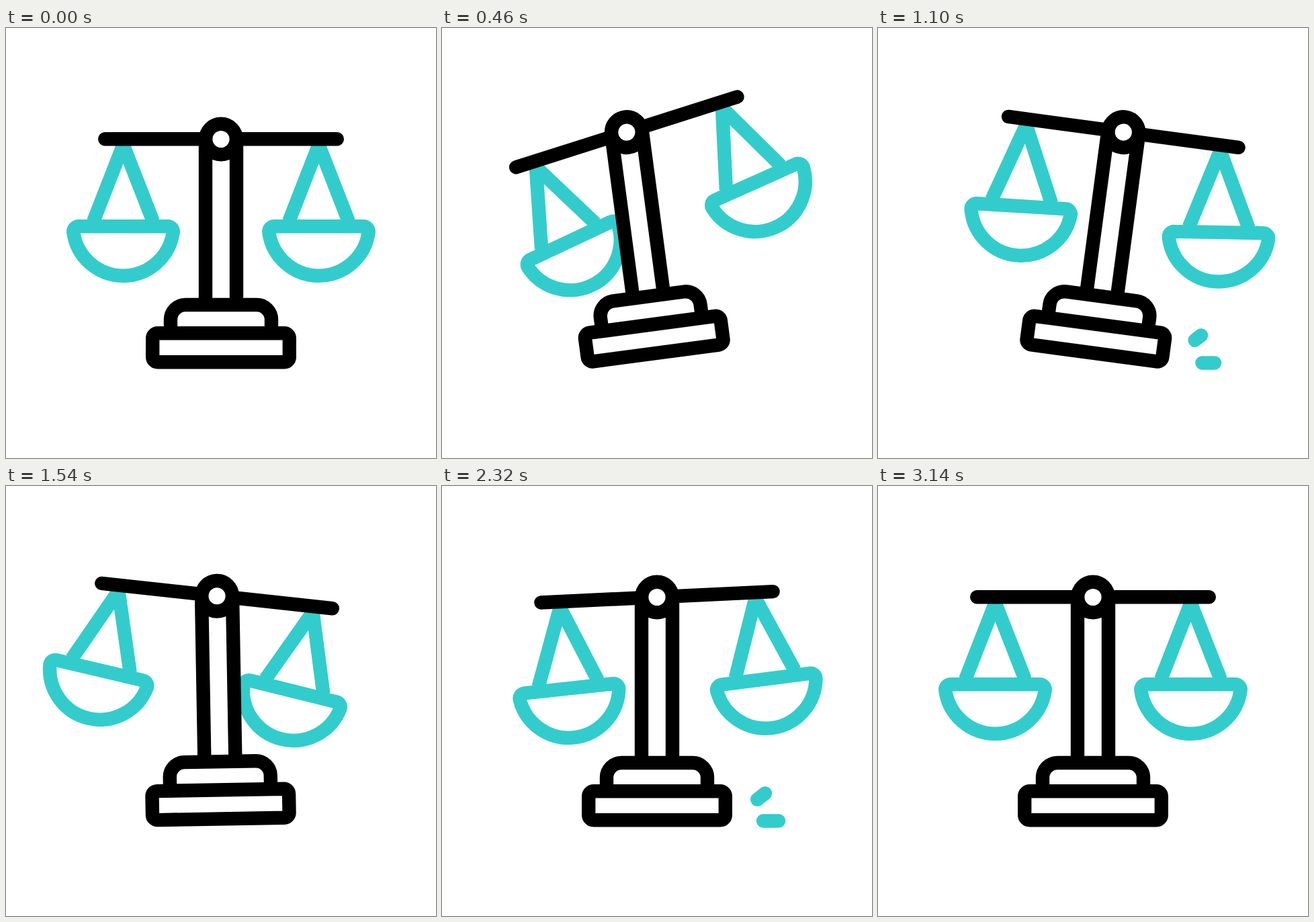
Animation, 640 px wide and 640 px high, one loop 3.6 s. Source, as an HTML page:

```html
<!DOCTYPE html>
<html lang="en">
<head>
<meta charset="utf-8">
<title>Swaying scales</title>
<style>
  html, body { margin: 0; width: 100%; height: 100%; overflow: hidden; background: #fff; }
  svg { display: block; width: 100vw; height: 100vh; }
  .line { fill: none; stroke: #000; stroke-width: 20.4; }
  .teal { fill: none; stroke: #33cccc; stroke-width: 20.4; stroke-linejoin: round; }
  .spark { stroke: #33cccc; stroke-width: 20.4; stroke-linecap: round; }
</style>
</head>
<body>
<svg viewBox="0 0 640 640">
  <defs>
    <g id="pan" class="teal">
      <path d="M130 288 L174.5 174 L219 288"/>
      <path d="M108.5 295.2 H240.5 a8 8 0 0 1 8.2 8.8 A74.9 74.9 0 0 1 100.3 304 a8 8 0 0 1 8.2 -8.8 Z"/>
    </g>
  </defs>
  <g id="body">
    <g id="beam">
      <use id="left" href="#pan"/>
      <g transform="translate(291 0)"><use id="right" href="#pan"/></g>
      <path class="line" stroke-linecap="round" d="M147.2 165.3 H492.8"/>
    </g>
    <path fill="#fff" d="M297 190 H343 V412 H297 Z"/>
    <path class="line" d="M297 165 V412 M343 165 V412"/>
    <circle class="line" cx="320" cy="165.5" r="22.8" style="fill:#fff"/>
    <path class="line" d="M245 454 V434 a22 22 0 0 1 22 -22 H373 a22 22 0 0 1 22 22 V454"/>
    <rect class="line" x="218.2" y="454.2" width="203.6" height="43" rx="7.5"/>
  </g>
  <g id="sparks">
    <line class="spark"/>
    <line class="spark"/>
  </g>
</svg>
<script>
  const LOOP = 3600, STEP = 20, REST = 3140;
  const $ = id => document.getElementById(id);
  const ease = u => (1 - Math.cos(Math.PI * u)) / 2;

  // Each rock of the stand leaves the ground when the one before it lands.
  const rocks = [
    { peak: 480, deg: -7.6, land: 760 },
    { peak: 1090, deg: 7.6, land: 1470 },
    { peak: 1860, deg: -3.1, land: 2010 },
    { peak: 2160, deg: 2.5, land: 2320 }
  ];
  rocks.forEach((rock, i) => rock.start = i ? rocks[i - 1].land : 0);

  // Outer end, direction towards the base, full length
  const rays = [
    { x: 501, y: 498.5, dx: -1, dy: 0, len: 40 },
    { x: 481, y: 457.4, dx: -0.787, dy: 0.617, len: 26 }
  ];

  // A damped swing: turns alternate in sign and shrink until the rest.
  function swing(size, turns, kick = 0) {
    const keys = [[0, 0]];
    if (kick) keys.push([185, kick]);
    turns.forEach((t, i) =>
      keys.push([t, size * (-1) ** (i + 1) * (1 - t / REST) ** 1.1]));
    keys.push([REST, 0]);
    return t => {
      const i = keys.findIndex(k => t < k[0]);
      if (i < 0) return 0;
      const [t0, a] = keys[i - 1], [t1, b] = keys[i];
      return a + (b - a) * ease((t - t0) / (t1 - t0));
    };
  }

  const beam = swing(15.2, [620, 1460, 2130, 2680]);
  const left = swing(17, [640, 1640, 2200, 2660], 3.6);
  const right = swing(20, [710, 1665, 2260, 2680], 3.6);

  // Rises slow down towards the peak, falls speed up towards the ground.
  function tilt(t) {
    const rock = rocks.find(r => t < r.land);
    if (!rock) return 0;
    const { start, peak, deg, land } = rock;
    if (t > peak) return deg * (1 - ((t - peak) / (land - peak)) ** 2);
    const u = (t - start) / (peak - start);
    return deg * (start ? 1 - (1 - u) ** 2 : ease(u));
  }

  function turn(id, deg, x, y) {
    $(id).setAttribute("transform", `rotate(${deg.toFixed(3)} ${x} ${y})`);
  }

  // The raised side throws sparks on landing, except after the last rock.
  function drawSparks(t) {
    const hit = rocks.slice(0, -1).find(r => t > r.land + 70 && t < r.land + 465);
    const group = $("sparks");
    group.style.display = hit ? "" : "none";
    if (!hit) return;
    const age = t - hit.land;
    const near = Math.min(1, (465 - age) / 270);
    const far = Math.max(0, 1 - (age - 70) / 125);
    group.setAttribute("transform", hit.deg > 0 ? "translate(632 -1) scale(-1 1)" : "");
    rays.forEach(({ x, y, dx, dy, len }, i) => {
      [near, far].forEach((k, n) => {
        group.children[i].setAttribute(`x${n + 1}`, x + dx * len * k);
        group.children[i].setAttribute(`y${n + 1}`, y + dy * len * k);
      });
    });
  }

  function draw(t) {
    const deg = tilt(t);
    turn("body", deg, deg < 0 ? 219 : 421, 501.5);
    turn("beam", beam(t), 320, 165.5);
    turn("left", left(t), 174.5, 165.5);
    turn("right", right(t), 174.5, 165.5);
    drawSparks(t);
  }

  const begin = performance.now();
  function tick() {
    const t = (performance.now() - begin) % LOOP;
    draw(Math.floor(t / STEP) * STEP);
    requestAnimationFrame(tick);
  }
  draw(0);
  requestAnimationFrame(tick);
</script>
</body>
</html>
```
